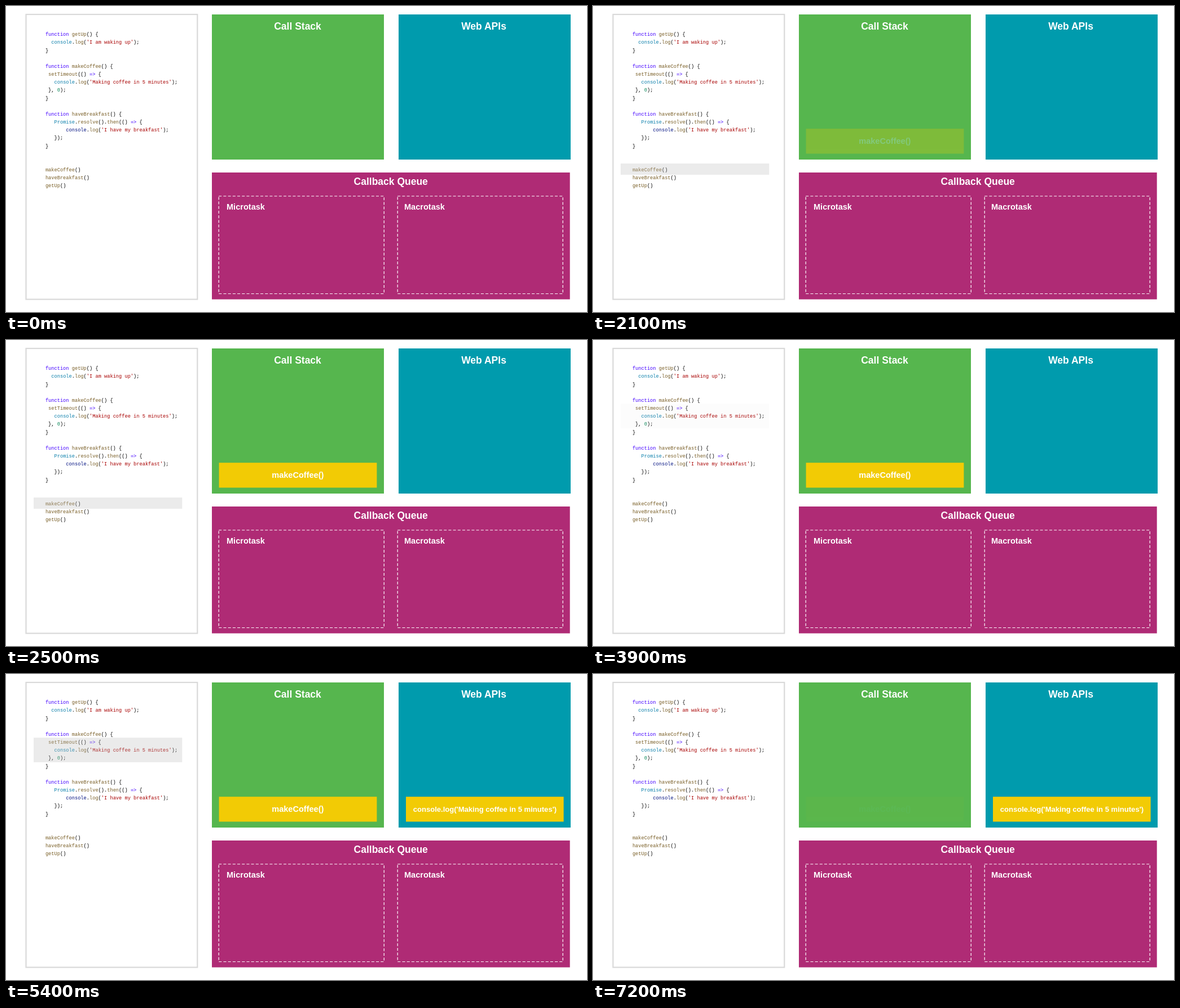
An HTML page that plays this animation: 1030 px wide and 544 px high, repeating every 8 s.

```html
<!DOCTYPE html>
<html lang="en">
<head>
<meta charset="utf-8">
<title>Event loop</title>
<style>
  html, body { margin: 0; width: 100%; height: 100%; overflow: hidden; background: #fff; }
  svg { display: block; width: 100%; height: 100%; }
  text { white-space: pre; }
  .bold { font-family: "Liberation Sans", Arial, sans-serif; font-weight: 700; fill: #fff; }
  .mid { text-anchor: middle; }
  .code { font: 8.68px "Liberation Mono", "Courier New", monospace; fill: #000; }
  .keyword { fill: #4200ff; }
  .object { fill: #0b7fab; }
  .local { fill: #001080; }
  .call { fill: #795e26; }
  .string { fill: #a80000; }
  .number { fill: #098658; }
  .dashed { fill: none; stroke: #fff; stroke-width: 1.2; stroke-dasharray: 5 3.2; }
  .mark { fill: #bcbcbc; fill-opacity: .3; }
  .task { fill: #f2cb05; }
</style>
</head>
<body>
<svg viewBox="0 0 1030 544">
  <rect x="35.5" y="15" width="303.8" height="506.5" fill="#fff" stroke="#d9d9d9" stroke-width="2.2"/>
  <g id="code"></g>

  <rect x="365" y="15" width="305" height="258" fill="#56b64e"/>
  <rect x="696" y="15" width="305" height="258" fill="#009bad"/>
  <rect x="365" y="296" width="634.7" height="225.5" fill="#af2b75"/>
  <rect class="dashed" x="377.2" y="338" width="293" height="173.5"/>
  <rect class="dashed" x="694.2" y="338" width="293" height="173.5"/>

  <g class="bold" font-size="17.5">
    <text class="mid" x="517" y="42.4">Call Stack</text>
    <text class="mid" x="847" y="42.4">Web APIs</text>
    <text class="mid" x="682.2" y="317.7">Callback Queue</text>
  </g>
  <g class="bold" font-size="14.55">
    <text x="391" y="361.9">Microtask</text>
    <text x="706" y="361.9">Macrotask</text>
  </g>

  <rect id="callMark" class="mark" x="49" y="280" width="263.3" height="20"/>
  <rect id="timerMark" class="mark" x="49" y="113.2" width="263.3" height="43.7"/>
  <g id="stackTask">
    <rect class="task" x="377.6" y="218.2" width="279.8" height="44.3"/>
    <text class="bold mid" x="517.3" y="245.4" font-size="14.55">makeCoffee()</text>
  </g>
  <g id="webTask">
    <rect class="task" x="709" y="218.2" width="279.6" height="44.3"/>
    <text class="bold mid" x="848.9" y="245.4" font-size="13.07">console.log('Making coffee in 5 minutes')</text>
  </g>
</svg>
<script>
const LOOP = 8000;
const $ = id => document.getElementById(id);

const source = `function getUp() {
  console.log('I am waking up');
}

function makeCoffee() {
 setTimeout(() => {
   console.log('Making coffee in 5 minutes');
 }, 0);
}

function haveBreakfast() {
   Promise.resolve().then(() => {
       console.log('I have my breakfast');
   });
}


makeCoffee()
haveBreakfast()
getUp()`;

const token = /(?<string>'[^']*')|(?<keyword>function|=>)|(?<local>(?<=^ {7})console)|(?<object>console|Promise)|(?<call>\w+(?=\())|(?<number>\d+)/g;

function colour(line) {
  return line.replace(token, (match, ...rest) => {
    const groups = rest.at(-1);
    const kind = Object.keys(groups).find(key => groups[key]);
    return `<tspan class="${kind}">${match.replace('>', '&gt;')}</tspan>`;
  });
}

$('code').innerHTML = source.split('\n').map((line, i) =>
  `<text class="code" x="69.9" y="${(53.3 + i * 14.16).toFixed(2)}">${colour(line)}</text>`
).join('');

// Each level holds until the next listed time.
const hold = steps => t => steps.reduce((level, [at, value]) => t >= at ? value : level, 0);

function stackLevel(t) {
  if (t < 2000) return 0;
  if (t >= 7200) return 0.03;
  const step = Math.floor((t - 2000) / 100);
  return Math.min(1, 0.075 + 0.185 * step);
}

const levels = {
  callMark: hold([[1300, 0.5], [1400, 1], [3900, 0]]),
  timerMark: hold([[3900, 0.17], [4300, 1], [6400, 0]]),
  stackTask: stackLevel,
  webTask: hold([[5000, 0.46], [5400, 1]])
};

function render(t) {
  for (const id in levels) $(id).setAttribute('opacity', levels[id](t));
}

const start = performance.now();
function tick() {
  render((performance.now() - start) % LOOP);
  requestAnimationFrame(tick);
}
tick();
</script>
</body>
</html>
```
